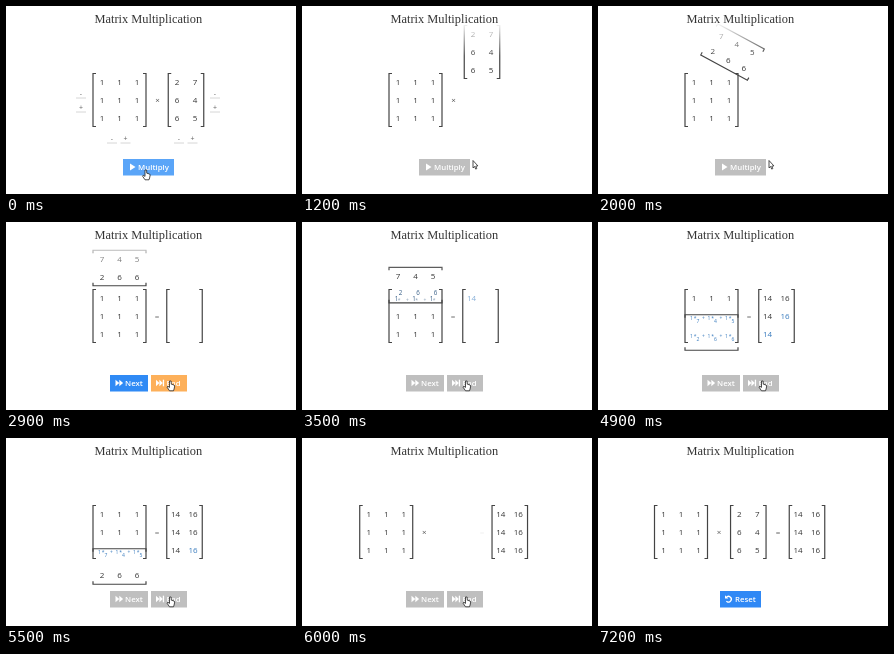
An HTML page with a canvas for the animation above (8000 ms loop, 290x188 px).

```html
<!DOCTYPE html>
<html lang="en">
<head>
<meta charset="utf-8">
<title>Matrix Multiplication</title>
<style>
  html, body { margin: 0; width: 100%; height: 100%; overflow: hidden; background: #fff; }
  canvas { display: block; width: 290px; height: 188px; }
</style>
</head>
<body>
<canvas id="stage"></canvas>
<script>
const W = 290, H = 188, LOOP = 8000, TICK = 100;
const INK = [51, 51, 51], BLUE = [52, 120, 188];
const SANS = '"Open Sans", "Noto Sans", sans-serif';
const A = [[1, 1, 1], [1, 1, 1], [1, 1, 1]];
const B = [[2, 7], [6, 4], [6, 5]];
const STOPS = [46, 74.5, 92.5, 110.5, 128.5];
const ROW_Y = [76, 94, 112];

const canvas = document.getElementById('stage');
const ctx = canvas.getContext('2d');
const dpr = window.devicePixelRatio || 1;
canvas.width = W * dpr;
canvas.height = H * dpr;

const lerp = (a, b, p) => a + (b - a) * p;
const ramp = (t, a, b) => Math.min(1, Math.max(0, (t - a) / (b - a)));
const smooth = p => p * p * (3 - 2 * p);
const easeOut = p => 1 - (1 - p) ** 2;
const mix = (a, b, p) => `rgb(${a.map((v, i) => Math.round(lerp(v, b[i], p)))})`;

function withAlpha(alpha, draw) {
  if (alpha <= 0) return;
  ctx.save();
  ctx.globalAlpha *= alpha;
  draw();
  ctx.restore();
}

function label(s, x, y, size = 8, color = mix(INK, INK, 0), weight = 400) {
  ctx.font = `${weight} ${size}px ${SANS}`;
  ctx.textAlign = 'center';
  ctx.fillStyle = color;
  ctx.fillText(s, x, y + size * 0.36);
}

function line(points, color = '#444', width = 1.2) {
  ctx.beginPath();
  points.forEach(([x, y]) => ctx.lineTo(x, y));
  ctx.strokeStyle = color;
  ctx.lineWidth = width;
  ctx.stroke();
}

function brackets(cx, cy, w) {
  for (const s of [-1, 1]) {
    const x = cx + s * w / 2, tick = x - s * 3;
    line([[tick, cy - 26.5], [x, cy - 26.5], [x, cy + 26.5], [tick, cy + 26.5]]);
  }
}

function polygon(points, color) {
  ctx.beginPath();
  points.forEach(([x, y]) => ctx.lineTo(x, y));
  ctx.closePath();
  ctx.fillStyle = color;
  ctx.fill();
}

const triangle = (x, w, h) => polygon([[x, 161 - h], [x + w, 161], [x, 161 + h]], '#fff');

const icons = {
  play(x) { triangle(x, 5.5, 3.6); },
  next(x) { triangle(x, 3.8, 3.3); triangle(x + 3.8, 3.8, 3.3); },
  end(x) {
    triangle(x, 3.4, 3.3);
    triangle(x + 3.4, 3.4, 3.3);
    ctx.fillRect(x + 6.8, 157.7, 1.3, 6.6);
  },
  reset(x) {
    ctx.beginPath();
    ctx.arc(x + 3.5, 161.2, 2.8, -2.5, 2.4);
    ctx.strokeStyle = '#fff';
    ctx.lineWidth = 1.3;
    ctx.stroke();
    polygon([[x, 157.2], [x + 3.3, 160.6], [x, 160.6]], '#fff');
  }
};

function button(x, w, color, icon, iconX, text, textX) {
  ctx.fillStyle = color;
  ctx.fillRect(x, 153, w, 16.5);
  icons[icon](iconX);
  label(text, textX, 161.2, 7.8, '#fff', 600);
}

function buttons(t) {
  const grey = '#bfbfbf';
  if (t < 2300) {
    button(117, 51, t < 700 ? '#5aa5f8' : grey, 'play', 124, 'Multiply', 147.5);
  } else if (t < 6600) {
    const busy = t >= 3100;
    button(104, 38, busy ? grey : '#2f8af5', 'next', 109.5, 'Next', 128);
    button(145, 36, busy ? grey : t < 2700 ? '#ff9d2e' : '#fdb05a', 'end', 150, 'End', 167.5);
  } else {
    button(122, 41, '#2f88f5', 'reset', 127, 'Reset', 147.5);
  }
}

function cursor(t) {
  if (t >= 6600) return;
  const out = smooth(ramp(t, 700, 1200)), back = smooth(ramp(t, 2500, 2800));
  const x = lerp(lerp(140, 171, out), 164.5, back);
  const y = lerp(lerp(164, 154.5, out), 159, back);
  const hand = t < 900 || t >= 2600;
  ctx.save();
  ctx.translate(x, y);
  ctx.beginPath();
  const shape = hand
    ? [[-1, 0], [0.6, 0], [0.8, 3.2], [3.6, 4], [4.2, 5], [3.6, 8], [3, 9.8], [-1, 9.8], [-3.4, 6.2], [-2.8, 5.2], [-1, 6.4]]
    : [[0, 0], [0, 7.4], [1.6, 6], [2.7, 8.6], [3.8, 8.1], [2.8, 5.6], [4.9, 5.4]];
  shape.forEach(p => ctx.lineTo(...p));
  ctx.closePath();
  ctx.fillStyle = '#fff';
  ctx.fill();
  ctx.strokeStyle = '#222';
  ctx.lineWidth = 0.8;
  ctx.stroke();
  ctx.restore();
}

function sizers(t) {
  const spot = (s, x, y) => {
    label(s, x, y, 7, '#666');
    line([[x - 5, y + 5], [x + 5, y + 5]], '#ccc', 0.8);
  };
  withAlpha(1 - ramp(t, 600, 1000), () => {
    for (const x of [75, 209]) { spot('-', x, 87); spot('+', x, 101); }
    for (const x of [106, 173]) { spot('-', x, 132); spot('+', x + 13.5, 132); }
  });
}

function matrixA(dx, step) {
  brackets(113.5 + dx, 94, 53);
  A.forEach((row, i) => {
    const p = step[i + 1] * (1 - step[i + 3]);
    const color = mix(INK, BLUE, p);
    row.forEach((v, c) => {
      const x = 96 + 17.5 * c + dx, y = ROW_Y[i];
      label(v, x - 2.5 * p, y + 2 * p, lerp(8, 5, p), color);
      withAlpha(p, () => {
        label('*', x + 1.2, y + 2.5, 5, color);
        if (c < 2) label('+', x + 9.5, y + 2.5, 5, color);
      });
    });
  });
}

function matrixB(cx, cy, turn, step) {
  const a = turn * Math.PI / 2, cos = Math.cos(a), sin = Math.sin(a);
  ctx.save();
  ctx.translate(cx, cy);
  ctx.rotate(-a);
  brackets(0, 0, 35.5);
  ctx.restore();
  const small = [step[1] * (1 - step[4]), step[2]];
  B.forEach((row, r) => row.forEach((v, c) => {
    const p = small[c], x = c * 18 - 9, y = (r - 1) * lerp(18, 17.5, turn);
    label(v, cx + x * cos + y * sin + 4 * p, cy - x * sin + y * cos - 2 * p,
      lerp(8, 5, p), mix(INK, BLUE, p));
  }));
}

function result(dx, step) {
  brackets(178.5 + dx, 94, 35.5);
  ROW_Y.forEach((y, i) => [14, 16].forEach((v, c) => {
    const k = i + c + 1;
    withAlpha(step[k], () =>
      label(v, 169.5 + 17.5 * c + dx, y, 8, mix(BLUE, INK, step[k + 1])));
  }));
}

function render(t) {
  ctx.setTransform(dpr, 0, 0, dpr, 0, 0);
  ctx.fillStyle = '#fff';
  ctx.fillRect(0, 0, W, H);

  const step = [1];
  for (let k = 1; k <= 4; k++) step[k] = ramp(t, 2600 + 600 * k, 3100 + 600 * k);
  step[5] = ramp(t, 5500, 5700);

  const turn = smooth(ramp(t, 1500, 2300));
  let y = lerp(94, STOPS[0], smooth(ramp(t, 700, 1200)));
  for (let k = 1; k <= 4; k++) y += (STOPS[k] - STOPS[k - 1]) * step[k];
  const spread = easeOut(ramp(t, 5600, 6100));
  const back = ramp(t, 5900, 6900);

  sizers(t);
  withAlpha(1 - step[5], () => matrixB(lerp(180, 113.5, turn), y, turn, step));

  // the lifted matrix dissolves towards the heading
  const veil = ctx.createLinearGradient(0, 16, 0, 50);
  veil.addColorStop(0, '#fff');
  veil.addColorStop(1, 'rgba(255,255,255,0)');
  ctx.fillStyle = veil;
  ctx.fillRect(0, 0, W, 50);

  matrixA(-30.5 * spread, step);
  withAlpha(ramp(t, 2000, 2300), () => result(30.5 * spread, step));

  withAlpha(1 - ramp(t, 1700, 2000) + ramp(t, 5600, 5900), () =>
    label('×', 151.5 - 30.5 * spread, 94, 8, '#555'));
  withAlpha(ramp(t, 2000, 2300) * (1 - ramp(t, 5500, 5700)), () =>
    label('=', 151, 94, 8, '#666'));
  withAlpha(back, () => label('=', 180, 94, 8, '#555'));
  withAlpha(ramp(t, 6100, 6900), () => matrixB(150.3, 94, 0, [0, 0, 0, 0, 0]));

  ctx.font = '12.4px "Liberation Serif", serif';
  ctx.textAlign = 'center';
  ctx.fillStyle = '#333';
  ctx.fillText('Matrix Multiplication', 142.3, 17);

  buttons(t);
  cursor(t);
}

const start = performance.now();
function frame() {
  const t = (performance.now() - start) % LOOP;
  render(Math.floor(t / TICK) * TICK);
  requestAnimationFrame(frame);
}
frame();
</script>
</body>
</html>
```
